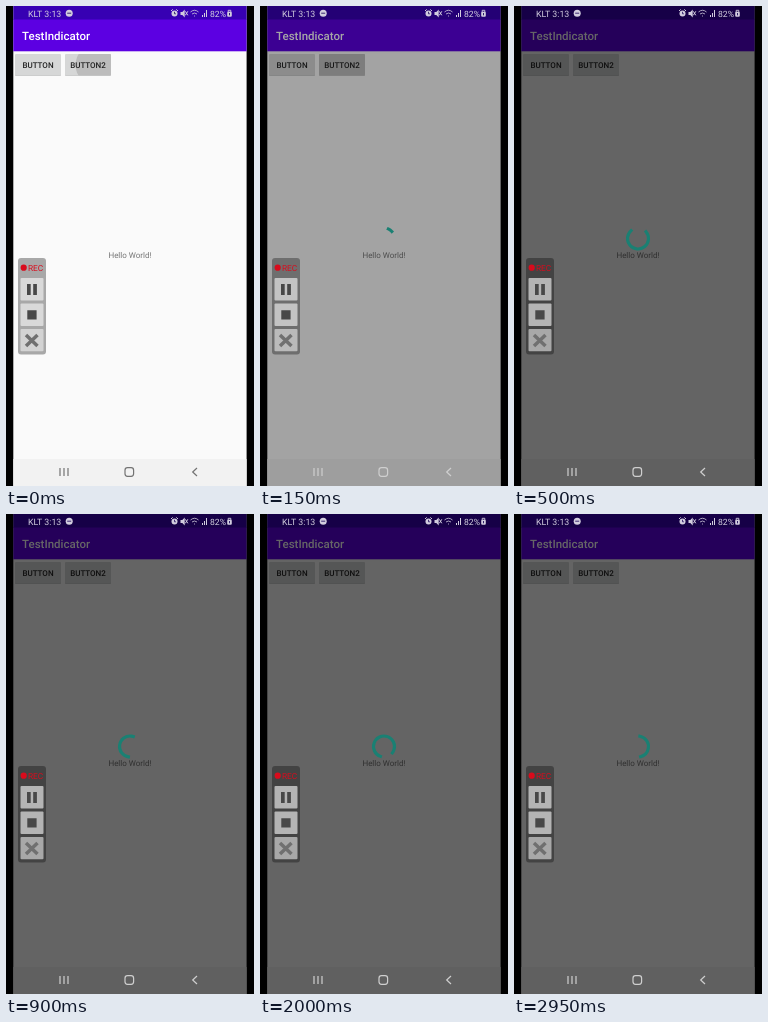
An HTML page for the animation above (3000 ms loop, 248x480 px).

```html
<!DOCTYPE html>
<html lang="en">
<head>
<meta charset="utf-8">
<title>Loading indicator</title>
<style>
html, body { margin: 0; width: 100%; height: 100%; overflow: hidden; background: #000; }
svg { display: block; width: 248px; height: 480px; }
text { font-family: Roboto, "Noto Sans", sans-serif; text-rendering: geometricPrecision; }
.medium { font-weight: 500; }
</style>
</head>
<body>
<svg viewBox="0 0 248 480">
  <defs>
    <clipPath id="pressed"><rect x="59" y="48" width="46" height="21.5" rx="1"/></clipPath>
  </defs>

  <!-- App -->
  <rect x="7.3" width="233.3" height="480" fill="#fafafa"/>
  <rect x="7.3" width="233.3" height="14" fill="#3700b3"/>
  <rect x="7.3" y="13.5" width="233.3" height="31.8" fill="#5c00e2"/>
  <text class="medium" x="16" y="34" font-size="11.5" fill="#fff">TestIndicator</text>
  <g fill="#d6d7d7">
    <rect x="9" y="49" width="46" height="21" rx="1" fill="#c4c4c4"/>
    <rect x="59" y="49" width="46" height="21" rx="1" fill="#c4c4c4"/>
    <rect x="9" y="48" width="46" height="21.5" rx="1"/>
    <rect x="59" y="48" width="46" height="21.5" rx="1"/>
  </g>
  <circle id="ripple" cx="90" cy="59" fill="#bcbcbc" clip-path="url(#pressed)"/>
  <g class="medium" font-size="8" fill="#222" text-anchor="middle">
    <text x="32" y="62">BUTTON</text>
    <text x="82" y="62">BUTTON2</text>
  </g>
  <text x="124" y="252.3" font-size="8" fill="#757575" text-anchor="middle">Hello World!</text>
  <rect x="7.3" y="453" width="233.3" height="27" fill="#f2f2f2"/>

  <rect id="dim" x="7" width="234" height="480"/>
  <circle id="arc" cx="124" cy="232.5" r="10.5" pathLength="360" fill="none"
    stroke="#1a8073" stroke-width="3.1" stroke-linecap="square"/>

  <!-- Status bar -->
  <g fill="#d2cdde" font-size="8.8">
    <text x="22" y="10.5">KLT 3:13</text>
    <circle cx="63.2" cy="7.2" r="3.5"/>
    <path d="M61.2 7.2h4" stroke="#3b2a70"/>
    <text x="204" y="10.5" font-size="8.6">82%</text>
    <circle cx="168.5" cy="7.5" r="3"/>
    <path d="M168.5 5.8v2h1.4" fill="none" stroke="#30216a" stroke-width=".9"/>
    <path d="M174.5 6h1.8l2.4-2.4v7.8L176.3 9h-1.8zM196 11V9h1v2zM198 11V7h1v4zM200 11V4h1v7z"/>
    <g fill="none" stroke="#d2cdde">
      <path d="M165 5l1.7-1.6M172 5l-1.7-1.6M179.3 5.3l2.5 4m0-4l-2.5 4"/>
      <path d="M184.5 6q4-3.5 8 0M186 8q2.5-2 5 0M188 10h1" stroke-width=".8"/>
      <path d="M222.2 6V4.3h2.6V6" stroke-width=".9"/>
    </g>
    <rect x="221.2" y="5.7" width="4.6" height="5" rx="1"/>
    <path d="M223.5 7v2.3" stroke="#30216a"/>
  </g>

  <!-- Navigation bar -->
  <g id="nav" fill="none" stroke-width="1.2">
    <path d="M54 462v8m4-8v8m4-8v8"/>
    <rect x="119" y="461.7" width="8.6" height="8.6" rx="2.5"/>
    <path d="M191 462l-4.3 4 4.3 4"/>
  </g>

  <!-- Recorder panel -->
  <rect x="12" y="252" width="28" height="96.5" rx="3" fill-opacity=".33"/>
  <circle cx="17.7" cy="261.7" r="3.1" fill="#d90b1c"/>
  <text x="22" y="264.7" font-size="8.3" fill="#d90b1c">REC</text>
  <g fill="#f4f4f4" fill-opacity=".64">
    <rect x="14.5" y="272" width="23" height="22.5" rx="1"/>
    <rect x="14.5" y="297.5" width="23" height="22.5" rx="1"/>
    <rect x="14.5" y="323" width="23" height="22.3" rx="1" fill-opacity=".57"/>
  </g>
  <path d="M21 278h3.7v11H21zM27.2 278h3.7v11h-3.7zM21.3 304.2h9.3v9.3h-9.3z" fill="#484848"/>
  <path d="M20 329l11.5 11m0-11L20 340" stroke="#707070" stroke-width="3.5"/>
</svg>
<script>
const LOOP = 3000, STEP = 50, CYCLE = 1333, START = 40, SWEEP = 288;
const DIM = [0, .05, .18, .35, .55, .6];
const el = id => document.getElementById(id);
const clamp = x => Math.min(1, Math.max(0, x));

// cubic-bezier(.4, 0, .2, 1)
function ease(x) {
  let lo = 0, hi = 1;
  for (let i = 0; i < 24; i++) {
    const s = (lo + hi) / 2, r = 1 - s;
    if (1.2 * s * r * r + .6 * s * s * r + s ** 3 < x) lo = s; else hi = s;
  }
  return lo * lo * (3 - 2 * lo);
}

// The head runs ahead in the first half of a cycle, the tail catches up in the second.
function drawArc(t) {
  const age = Math.max(0, t - START);
  const p = age % CYCLE / CYCLE;
  const tail = SWEEP * ease(clamp(2 * p - 1));
  const head = SWEEP * ease(clamp(2 * p));
  const spin = 18 + 36 * (age / 1000) ** 2.1;
  const length = Math.max(.1, head - tail);
  const angle = tail + (360 - SWEEP) * p + spin - 90;
  el("arc").setAttribute("stroke-dasharray", `${length} ${360 - length}`);
  el("arc").setAttribute("transform", `rotate(${angle} 124 232.5)`);
  el("arc").setAttribute("opacity", clamp(age / 110));
}

function draw(now) {
  const step = Math.floor(now % LOOP / STEP), t = step * STEP;
  const gray = Math.round(115 + 92 * clamp(t / 150));
  el("dim").setAttribute("opacity", DIM[Math.min(step, DIM.length - 1)]);
  el("ripple").setAttribute("r", 20.5 + 20 * clamp(t / 100));
  el("ripple").setAttribute("opacity", clamp((400 - t) / 300));
  el("nav").setAttribute("stroke", `rgb(${gray},${gray},${gray})`);
  drawArc(t);
}

let begin;
function tick(now) {
  begin ??= now;
  draw(now - begin);
  requestAnimationFrame(tick);
}
draw(0);
requestAnimationFrame(tick);
</script>
</body>
</html>
```
